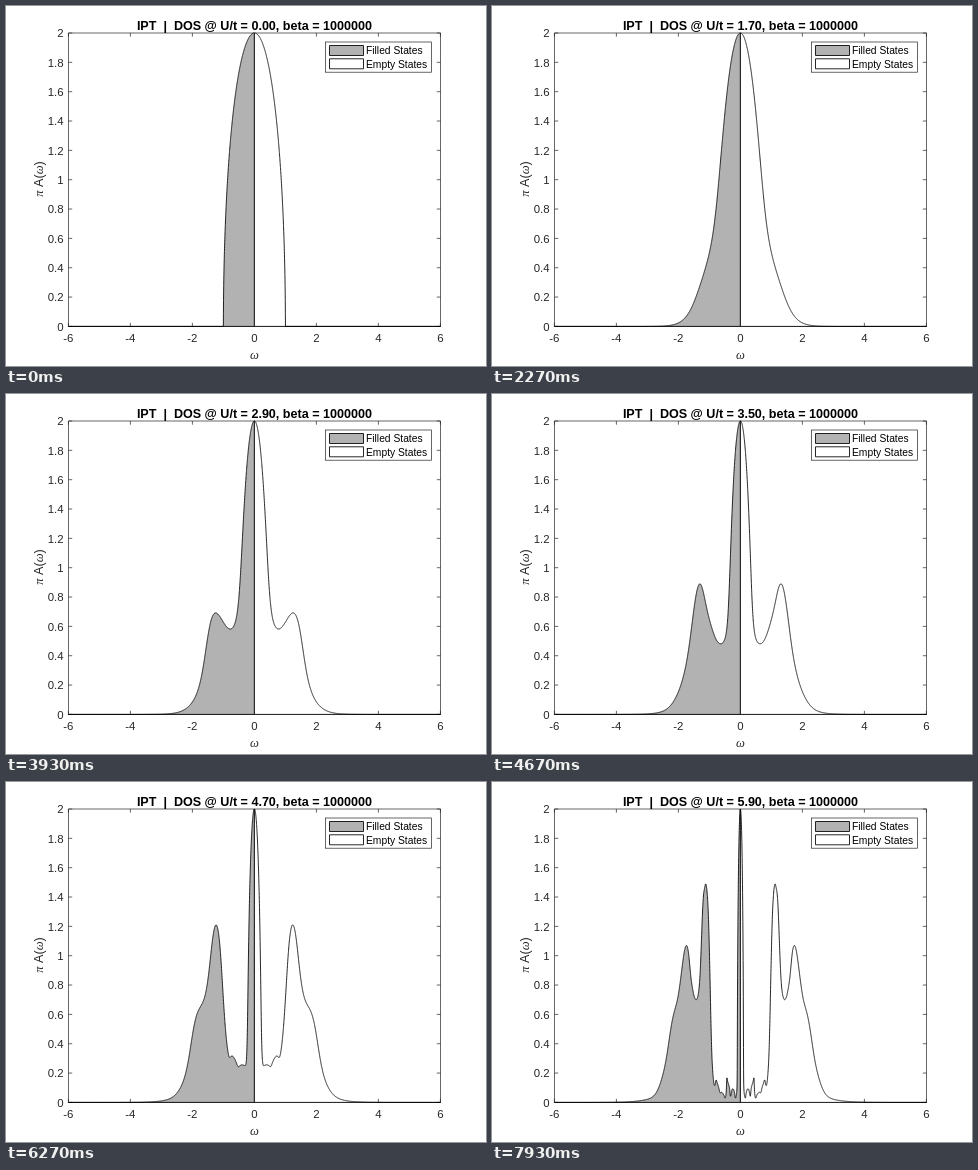
Write an HTML page that moves like this. It is 480 by 360 pixels and loops after 8000 ms.

```html
<!DOCTYPE html>
<html lang="en">
<head>
<meta charset="utf-8">
<title>Density of states</title>
<style>
  html, body { margin: 0; width: 100%; height: 100%; overflow: hidden; background: #fff; }
  svg { display: block; width: 480px; height: 360px; }
  text { font: 11.43px "Liberation Sans", Arial, sans-serif; fill: #262626; }
  .title { font-size: 12.57px; font-weight: bold; fill: #000; }
  .label { font-size: 12.57px; }
  .key { font-size: 10.29px; fill: #000; }
  .greek { font-family: "Liberation Serif", "Times New Roman", serif; font-style: italic; }
  .mid { text-anchor: middle; }
  .end { text-anchor: end; }
  .axis { fill: none; stroke: #262626; stroke-width: .7; }
  .area { stroke: #000; stroke-width: .85; stroke-linejoin: round; }
  .filled { fill: #b2b2b2; }
  .empty { fill: #fff; }
</style>
</head>
<body>
<svg viewBox="0 0 480 360">
  <path id="frame" class="axis"/>
  <path id="filled" class="area filled"/>
  <path id="empty" class="area empty"/>
  <g id="ticks"></g>
  <text id="title" class="title mid" x="248.4" y="24"></text>
  <text class="label greek mid" x="248.4" y="353">ω</text>
  <text class="label mid" transform="translate(36.5 173) rotate(-90)"><tspan class="greek">π</tspan> A(<tspan class="greek">ω</tspan>)</text>
  <rect class="axis" x="319.5" y="36" width="106" height="30.2" style="fill:#fff"/>
  <rect class="area filled" x="323.5" y="39.5" width="34" height="10"/>
  <rect class="area empty" x="323.5" y="52.8" width="34" height="10"/>
  <text class="key" x="360" y="48.4">Filled States</text>
  <text class="key" x="360" y="62.1">Empty States</text>
</svg>
<script>
const $ = id => document.getElementById(id);
const STEPS = 60, LOOP = 8000;

// Frequency grid: period SPAN, N points, the first M cover 0..6
const N = 32768, SPAN = 24, dw = SPAN / N, M = N / 4 + 1;
const re = new Float64Array(N), im = new Float64Array(N);
const cosT = new Float64Array(N / 2), sinT = new Float64Array(N / 2), rev = new Uint16Array(N);
for (let i = 0; i < N / 2; i++) {
  cosT[i] = Math.cos(2 * Math.PI * i / N);
  sinT[i] = -Math.sin(2 * Math.PI * i / N);
}
for (let i = 1; i < N; i++) rev[i] = (rev[i >> 1] >> 1) | (i & 1 ? N / 2 : 0);

function fft() {
  for (let i = 0; i < N; i++) {
    const j = rev[i];
    if (j > i) {
      let s = re[i]; re[i] = re[j]; re[j] = s;
      s = im[i]; im[i] = im[j]; im[j] = s;
    }
  }
  for (let half = 1; half < N; half *= 2) {
    const stride = N / (2 * half);
    for (let k = 0; k < half; k++) {
      const c = cosT[k * stride], s = sinT[k * stride];
      for (let a = k; a < N; a += 2 * half) {
        const b = a + half;
        const x = re[b] * c - im[b] * s, y = re[b] * s + im[b] * c;
        re[b] = re[a] - x; im[b] = im[a] - y;
        re[a] += x; im[a] += y;
      }
    }
  }
}

// Local Green's function on the Bethe lattice, half bandwidth 1
const gr = new Float64Array(M), gi = new Float64Array(M).fill(-2);

// One round of iterated perturbation theory at zero temperature
function iterate(U) {
  re.fill(0);
  im.fill(0);
  for (let j = 0; j < M; j++) {
    const d = j * dw - gr[j] / 4, e = -gi[j] / 4;
    re[j] = e / (Math.PI * (d * d + e * e));
  }
  re[0] /= 2;
  fft();
  // Threefold convolution, made causal in time
  const scale = 2 * U * U * dw * dw / N;
  for (let n = 0; n < N; n++) {
    const h = n % (N / 2) === 0 ? 1 : n < N / 2 ? 2 : 0;
    re[n] = h * scale * re[n] * (re[n] * re[n] - 3 * im[n] * im[n]);
    im[n] = 0;
  }
  fft();
  // Removes the leading error of the periodic Hilbert kernel
  const slope = 1 - (Math.PI * U / SPAN) ** 2 / 12;
  for (let j = 0; j < M; j++) {
    const x = j * dw * slope + Math.PI * im[j], y = Math.max(0, Math.PI * re[j]);
    const p = x * x - y * y - 1, r = Math.hypot(p, 2 * x * y);
    const rootR = Math.sqrt(Math.max(0, (r + p) / 2)) * (x < 0 ? -1 : 1);
    const rootI = Math.sqrt(Math.max(0, (r - p) / 2));
    gr[j] = 2 * (x - rootR);
    gi[j] = Math.min(0, 2 * (y - rootI));
  }
}

// U grows by one step per round, so the solution trails slightly behind it
const spectra = Array.from({ length: STEPS }, (_, k) => {
  iterate(k / 20);
  return Float32Array.from(gi, g => -g);
});

const px = w => 248.4 + 31 * w, py = a => 320.4 - 146.7 * a;

function areaPath(spec, side) {
  let d = `M${px(0)} ${py(0)}`;
  for (let j = 0; j < M; j += 4)
    d += `L${px(side * j * dw).toFixed(2)} ${py(spec[j]).toFixed(2)}`;
  return d + `L${px(side * 6)} ${py(0)}Z`;
}

function drawAxes() {
  let d = "M62.5 27H434.5V320.5H62.5Z", labels = "";
  for (let w = -6; w <= 6; w += 2) {
    d += `M${px(w)} 320.5v-3.7M${px(w)} 27v3.7`;
    labels += `<text class="mid" x="${px(w)}" y="336.3">${w}</text>`;
  }
  for (let i = 0; i <= 10; i++) {
    const y = py(i / 5);
    d += `M62.5 ${y}h3.7M434.5 ${y}h-3.7`;
    labels += `<text class="end" x="57.6" y="${y + 4.2}">${i / 5}</text>`;
  }
  $("frame").setAttribute("d", d);
  $("ticks").innerHTML = labels;
}

let shown = -1;
function show(t) {
  const k = Math.min(STEPS - 1, Math.floor((t + 3.4) * 3 / 400));
  if (k === shown) return;
  shown = k;
  $("filled").setAttribute("d", areaPath(spectra[k], -1));
  $("empty").setAttribute("d", areaPath(spectra[k], 1));
  $("title").textContent =
    `IPT\u00a0 |\u00a0 DOS @ U/t = ${(k / 10).toFixed(2)}, beta = 1000000`;
}

drawAxes();
show(0);
const start = performance.now();
function tick() {
  show((performance.now() - start) % LOOP);
  requestAnimationFrame(tick);
}
requestAnimationFrame(tick);
</script>
</body>
</html>
```
